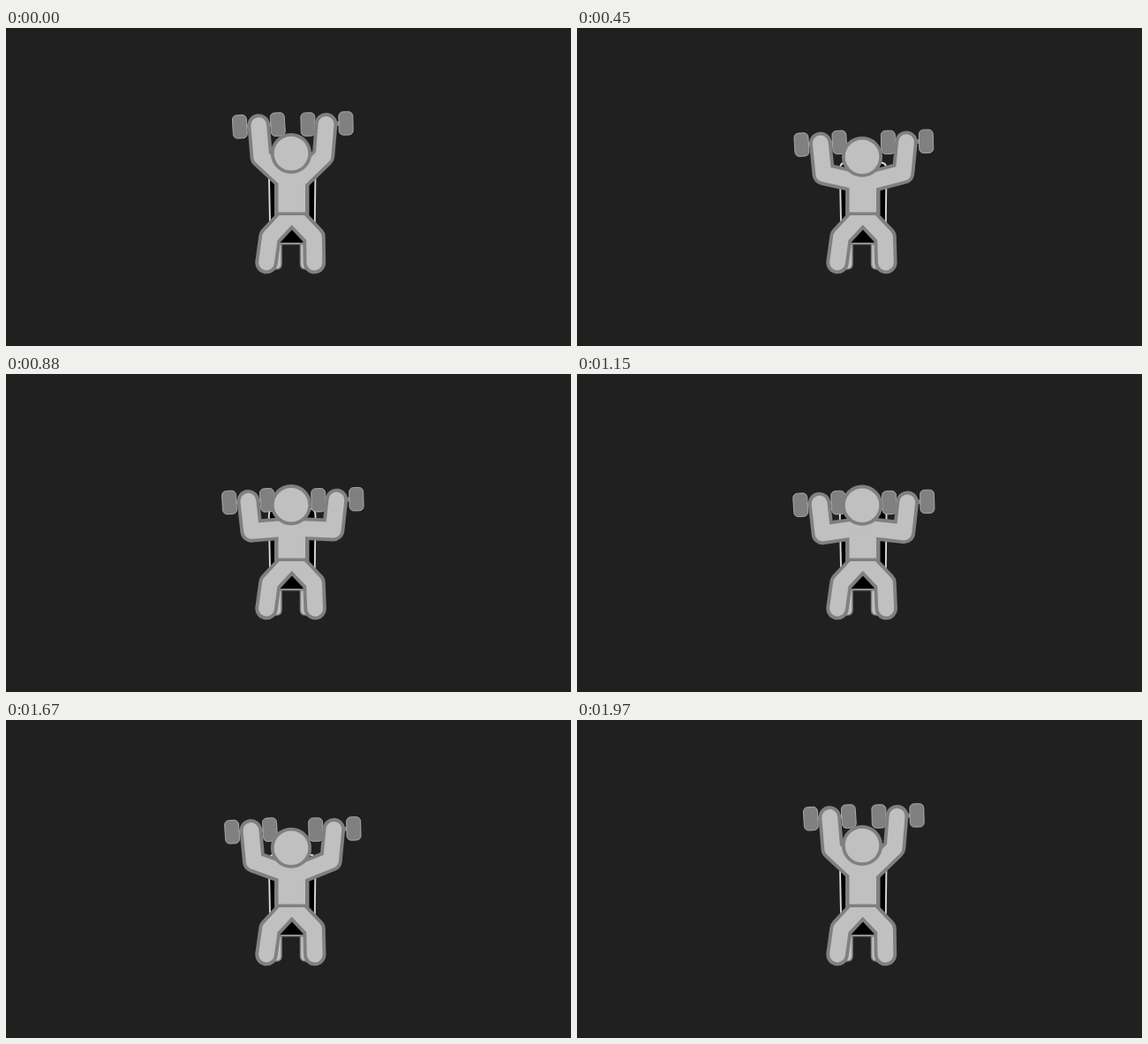
These frames come from a looping animation (640 px wide and 360 px high, 2210 ms). An HTML page:

```html
<!DOCTYPE html>
<html lang="en">
<head>
<meta charset="utf-8">
<title>Shoulder press</title>
<style>
  html, body { margin: 0; width: 100%; height: 100%; overflow: hidden; background: #202020; }
  svg { display: block; width: 100vw; height: 100vh; }
  .limb { fill: none; stroke-linecap: round; stroke-linejoin: round; }
  .edge { stroke: #808080; stroke-width: 25.5; }
  .skin { stroke: #c0c0c0; stroke-width: 17.8; }
  .plate { fill: #808080; stroke: #b8b8b8; stroke-width: .8; }
</style>
</head>
<body>
<svg viewBox="0 0 640 360">
  <defs>
    <g id="bell">
      <rect x="-21" y="-2.5" width="42" height="5" fill="#808080"/>
      <rect class="plate" x="-29.5" y="-13.2" width="16" height="26.4" rx="5"/>
      <rect class="plate" x="13.5" y="-13.2" width="16" height="26.4" rx="5"/>
    </g>
  </defs>

  <g id="chair">
    <path d="M299.5 244L297.8 160Q297.8 152.5 304 152.5H344.5Q350.5 152.5 350.5 160L349.5 244Z" stroke="#d8d8d8" stroke-width="1.9"/>
    <g fill="#c0c0c0" stroke="#808080" stroke-width="1.5">
      <path d="M303 244H312V267Q312 273 306 273H303Z"/>
      <path d="M343 244H333.5V267Q333.5 273 339.5 273H343Z"/>
    </g>
    <path d="M310 244.4H338" stroke="#808080" stroke-width="2"/>
  </g>

  <use href="#bell" id="bellL"/>
  <use href="#bell" id="bellR"/>

  <path class="limb edge legs"/>
  <path class="limb skin legs"/>

  <path class="limb edge arms"/>
  <rect class="torso" x="304" width="39.5" fill="#808080"/>
  <path class="limb skin arms"/>
  <rect class="torso" x="308.5" width="30.5" fill="#c0c0c0"/>
  <path d="M305 210.2H343" stroke="#808080" stroke-width="3.6"/>

  <circle id="head" cx="323" r="21.2" fill="#c0c0c0" stroke="#808080" stroke-width="3.8"/>
</svg>
<script>
  const LOOP = 2210, AXIS = 324.4, UPPER_ARM = 34.5;
  const RIGHT_LIFT = 1.2; // the right hand is held a little higher
  const $ = id => document.getElementById(id);
  const setAll = (sel, name, value) =>
    document.querySelectorAll(sel).forEach(el => el.setAttribute(name, value));
  const clamp = x => Math.min(1, Math.max(0, x));
  const line = points => 'M' + points.map(p => p.map(v => v.toFixed(2)).join(' ')).join('L');
  const mirror = ([x, y], lift = 0) => [2 * AXIS - x, y - lift];

  // 0 = arms raised, 1 = arms lowered
  function lowered(t) {
    if (t < 1320) return Math.sin(clamp((t - 18) / 1150) * Math.PI / 2);
    return (1 + Math.cos(clamp((t - 1320) / 630) * Math.PI)) / 2;
  }

  function placeBell(id, [x, y], dx, dy, tilt) {
    $(id).setAttribute('transform', `translate(${x + dx} ${y + dy}) rotate(${tilt})`);
  }

  function pose(p) {
    const shoulder = [312.5 + 2 * (1 - p) ** 2, 169.5 + 6 * p];
    const elbowY = 146 + 34.5 * p;
    const elbow = [shoulder[0] - Math.sqrt(UPPER_ARM ** 2 - (elbowY - shoulder[1]) ** 2), elbowY];
    const hand = [elbow[0] - 3 - 0.8 * p, 110 + 36.5 * p];
    const handR = mirror(hand, RIGHT_LIFT);

    setAll('.arms', 'd', line([hand, elbow, shoulder,
                               mirror(shoulder), mirror(elbow, RIGHT_LIFT), handR]));
    setAll('.torso', 'y', shoulder[1]);
    setAll('.torso', 'height', 212 - shoulder[1]);
    setAll('.legs', 'd', line([[295, 265.5], [299, 236.5], [323.7, 209.8],
                               [349, 236.5], [349.4 + 0.8 * p, 265.5]]));
    $('head').setAttribute('cy', 142 + 6.7 * p);
    placeBell('bellL', hand, 0.1, 0.4, -3.5);
    placeBell('bellR', handR, 1, -0.3, -1.5);
  }

  const start = performance.now();
  function frame() {
    pose(lowered((performance.now() - start) % LOOP));
    requestAnimationFrame(frame);
  }
  frame();
</script>
</body>
</html>
```
